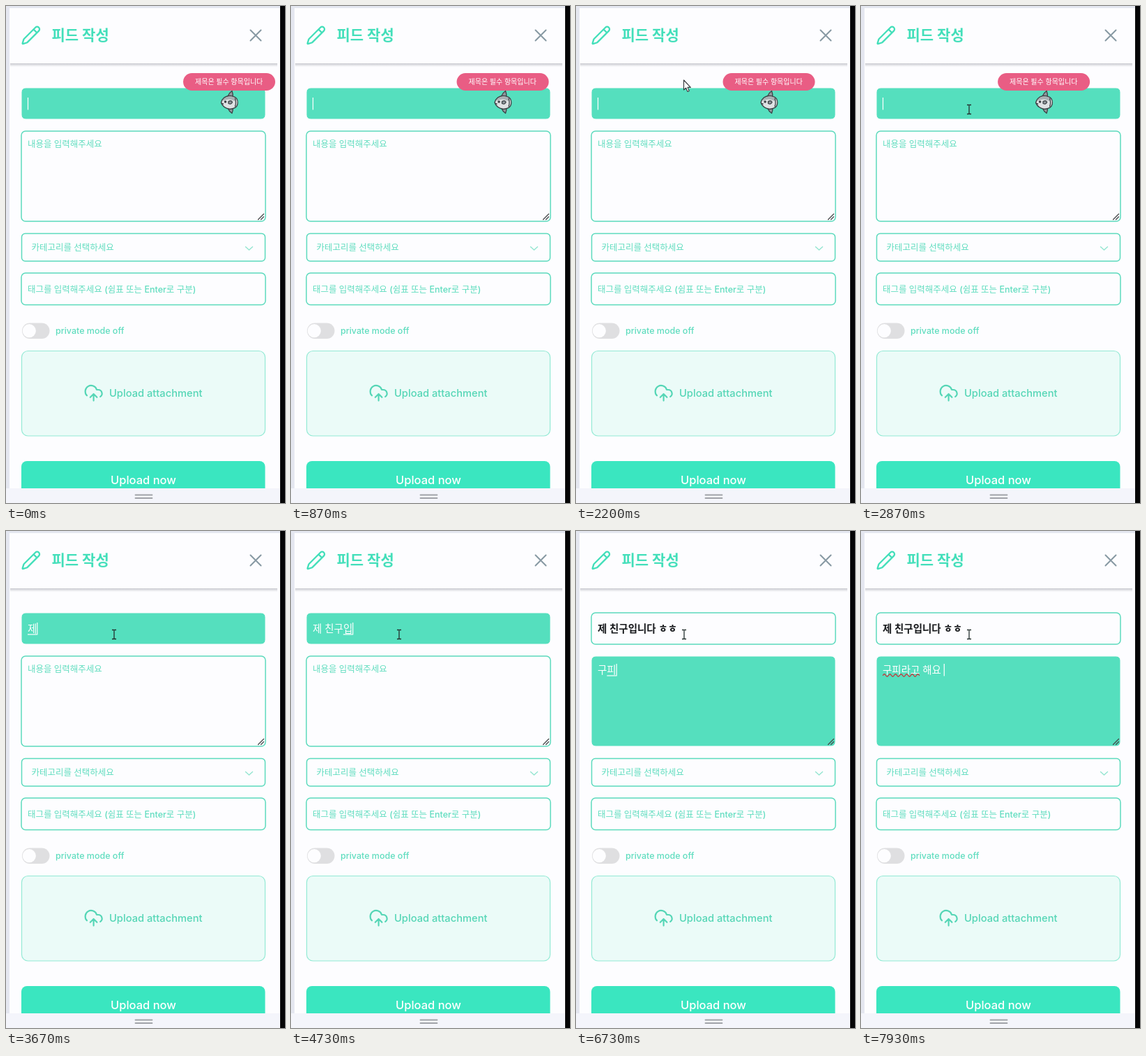
Write an HTML page that moves like this. It is 400 px wide and 711 px high and loops after 8000 ms.

```html
<!DOCTYPE html>
<html lang="ko">
<head>
<meta charset="utf-8">
<title>피드 작성</title>
<style>
  html, body { margin: 0; width: 100%; height: 100%; overflow: hidden; background: #e4e7f0; }
  svg { display: block; }
  text { font-family: Inter, 'Noto Sans CJK KR', 'Noto Sans CJK', sans-serif; font-size: 12.5px; font-weight: 500; fill: #60ddbf; white-space: pre; }
  .line { fill: none; stroke-linecap: round; stroke-linejoin: round; }
  .field { fill: #fdfdff; stroke: #5cdabd; stroke-width: 1.5; }
  .focus { fill: #55dfbe; stroke: #fdfdff; }
  .typed { font-size: 14.5px; fill: #17191c; font-weight: 600; }
  .typed.active { fill: #fff; font-weight: 500; }
</style>
</head>
<body>
<svg width="400" height="711" viewBox="0 0 400 711">
  <defs>
    <linearGradient id="shade" x2="0" y2="1">
      <stop stop-color="#c9cad0"/>
      <stop offset="1" stop-color="#fdfdff"/>
    </linearGradient>
  </defs>

  <rect width="400" height="711" fill="#e4e7f0"/>
  <rect x="5" y="3" width="388" height="708" fill="#fdfdff"/>
  <rect x="393" width="7" height="711" fill="#050506"/>
  <rect x="6" y="82" width="383" height="5" fill="url(#shade)"/>

  <path class="line" stroke="#43dfba" stroke-width="1.9" transform="translate(21.2 27.3) scale(1.22)"
    d="M21.17 6.81a1 1 0 0 0-3.98-3.99L3.84 16.17a2 2 0 0 0-.5.83l-1.32 4.36a.5.5 0 0 0 .62.62L7 20.66a2 2 0 0 0 .83-.5zM15 5l4 4"/>
  <text x="65.5" y="49" style="font-size:21px;font-weight:700;fill:#43dfba">피드 작성</text>
  <path class="line" stroke="#8799a3" stroke-width="2" d="M350.5 34.5l15 15m0-15l-15 15"/>

  <rect id="titleBox" x="22" y="117" width="350" height="45" rx="6"/>
  <text id="title" class="typed" x="31" y="145"></text>

  <rect id="bodyBox" x="22" y="179" width="350" height="129" rx="6"/>
  <text id="hint" x="31" y="201.5">내용을 입력해주세요</text>
  <text id="body" class="typed" x="31" y="204"></text>
  <path id="wave" class="line" stroke="#c23a3d" stroke-width="1.4"/>
  <path class="line" stroke="#45494b" stroke-width="1.3" d="M361.5 305.5l8-8m-4 8l4-4"/>

  <path id="under" stroke="#fff" stroke-width="1.2"/>
  <path id="caret" stroke="#fff" stroke-width="1.2"/>

  <rect class="field" x="22.5" y="325.5" width="349" height="39.5" rx="5"/>
  <text x="36.5" y="350">카테고리를 선택하세요</text>
  <path class="line" stroke="#93e5d0" stroke-width="1.4" d="M343.5 344.5l5 4.5 5-4.5"/>

  <rect class="field" x="22" y="382" width="350" height="45.5" rx="6"/>
  <text x="31" y="410.3">태그를 입력해주세요 (쉼표 또는 Enter로 구분)</text>

  <rect x="23" y="453.5" width="39.5" height="22.5" rx="11.2" fill="#dfdfe1"/>
  <circle cx="33.3" cy="464.7" r="9.6" fill="#fdfdff"/>
  <text x="71" y="469.3">private mode off</text>

  <rect x="22.5" y="493.5" width="349" height="121.5" rx="9" fill="#ebfbf8" stroke="#94ead5" stroke-width="1.2"/>
  <path class="line" stroke="#55d6b6" stroke-width="1.8" transform="translate(111.2 539.4) scale(1.2)"
    d="M12 13v8M4 14.9A7 7 0 1 1 15.71 8h1.79a4.5 4.5 0 0 1 2.5 8.24M8 17l4-4 4 4"/>
  <text x="148" y="558.7" style="font-size:14.7px;fill:#55d6b6">Upload attachment</text>

  <rect x="22" y="651" width="349.5" height="50" rx="8" fill="#3ae6c0"/>
  <text x="150" y="684" style="font-size:16.5px;fill:#fff">Upload now</text>
  <rect y="690" width="393" height="21" fill="#f4f5fb"/>
  <path class="line" stroke="#a0a3a8" stroke-width="1.8" d="M185.5 699.5h24m-24 4.5h24"/>

  <g id="toast">
    <rect x="254" y="96" width="132" height="25" rx="12.5" fill="#e95d84"/>
    <text x="271" y="112.2" style="font-size:10px;fill:#fff">제목은 필수 항목입니다</text>
    <g class="line" stroke="#3b4145" stroke-width="1.3">
      <path fill="#8f979c" d="M318 129Q320 124 324 121.5Q326 126 325 131zM318 146Q320 151 324 153.5Q326 149 325 144z"/>
      <path fill="#dfe2e4" d="M308.5 138Q311 129 321 128.5Q328 129 331 133Q333.5 138 331 143Q328 147 321 147.5Q311 146 308.5 138z"/>
      <path fill="#a9b0b4" stroke="none" d="M310 136Q313 130 321 129.3Q327 129.5 330 133L328 136Q320 131 310 136z"/>
      <path fill="#8f979c" d="M319 136.5q4-2 5.5 1-1.500 4-5.500 2z"/>
      <path d="M328.500 132.500q2 5.500 0 11M309 139.500l2.500 .5"/>
      <circle cx="314.500" cy="137" r="1.100" fill="#222"/>
    </g>
  </g>

  <path id="arrow" fill="#fff" stroke="#33363a" stroke-width="1.100" stroke-linejoin="round"
    d="M0 0v14l3.200-2.800 2.200 5.200 2.300-1-2.200-5h4.300z"/>
  <path id="beam" fill="none" stroke="#24302e" stroke-width="1.300" d="M-3-6.500h2.200L0-6l.8-.5H3M0-6V6M-3 6.500h2.200L0 6l.8.500H3"/>
</svg>
<script>
const LOOP = 8000, STROKE = 120, TAB = 6000;
const $ = id => document.getElementById(id);

// One entry per keystroke while the syllables are being composed.
const titleKeys = { start: 3480, x: 31, texts:
  'ㅈ|제|제 |제 ㅊ|제 치|제 친|제 친ㄱ|제 친구|제 친궁|제 친구이|제 친구입|제 친구입ㄴ|제 친구입니|제 친구입닏|제 친구입니다|제 친구입니다 |제 친구입니다 ㅎ|제 친구입니다 ㅎㅎ'.split('|') };
const bodyKeys = { start: 6330, x: 31, texts:
  'ㄱ|구|굪|구피|구필|구피라|구피락|구피라고|구피라고 |구피라고 ㅎ|구피라고 해|구피라고 행|구피라고 해요|구피라고 해요 '.split('|') };

function typed({ start, texts }, t) {
  const i = Math.min(Math.floor((t - start) / STROKE), texts.length - 1);
  return { text: i < 0 ? '' : texts[i], at: start + i * STROKE };
}

const show = (id, on) => $(id).style.display = on ? '' : 'none';
const clamp = v => Math.max(0, Math.min(1, v));
const ease = v => v * v * (3 - 2 * v);
const glide = (t, from, to) => ease(clamp((t - from) / (to - from)));

$('wave').setAttribute('d', 'M31.500 206.500q2-3.500 4 0' + 't4 0'.repeat(12));

function drawInput(id, text, active) {
  const el = $(id);
  el.textContent = text;
  el.classList.toggle('active', active);
  $(id + 'Box').setAttribute('class', active ? 'focus' : 'field');
}

function drawCaret(id, text, bottom, lit) {
  const el = $(id), n = text.length;
  const end = 31 + (n ? el.getComputedTextLength() : 0);
  const composing = n > 0 && !text.endsWith(' ');
  $('caret').setAttribute('d', `M${end + .5} ${bottom - 17}v17.500`);
  show('caret', lit);
  show('under', composing);
  if (composing) $('under').setAttribute('d', `M${el.getStartPositionOfChar(n - 1).x} ${bottom}H${end}`);
}

function drawPointer(t) {
  const y = 30 + 76 * glide(t, 1800, 2150) + 42 * glide(t, 2300, 2700);
  const overField = y > 117;
  show('arrow', t >= 1800 && !overField);
  show('beam', overField);
  $('arrow').setAttribute('transform', `translate(154.500 ${y})`);
  $('beam').setAttribute('transform', `translate(155 ${y})`);
}

function draw(t) {
  const title = typed(titleKeys, t), body = typed(bodyKeys, t);
  const onTitle = t < TAB;
  drawInput('title', title.text, onTitle);
  drawInput('body', body.text, !onTitle);
  show('hint', onTitle);
  show('wave', body.text.startsWith('구피라고 '));

  const current = onTitle ? title : body;
  const lastKey = current.text ? current.at : onTitle ? -200 : TAB;
  drawCaret(onTitle ? 'title' : 'body', current.text, onTitle ? 148 : 207, (t - lastKey) % 1000 < 500);

  const s = t / 1000;
  show('toast', !title.text);
  $('toast').setAttribute('transform', `translate(${-18.300 * s - .65 * s * s} 0)`);
  drawPointer(t);
}

const begin = performance.now();
function tick() {
  draw((performance.now() - begin) % LOOP);
  requestAnimationFrame(tick);
}
tick();
</script>
</body>
</html>
```
